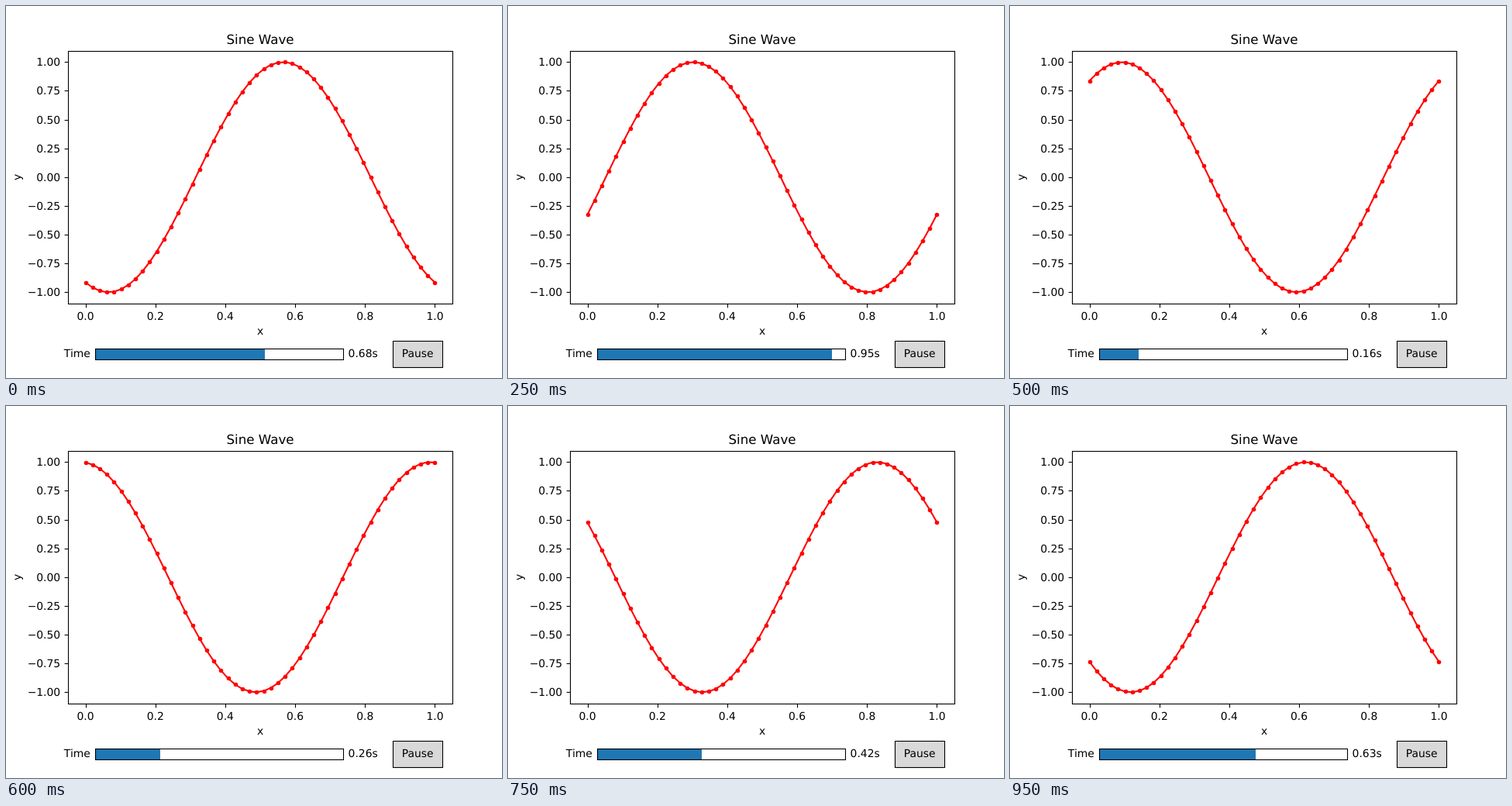
These frames come from a looping animation (640x480 px, 1000 ms). An HTML page:

```html
<!DOCTYPE html>
<html lang="en">
<head>
<meta charset="utf-8">
<title>Sine Wave</title>
<style>
  html, body { margin: 0; width: 100%; height: 100%; overflow: hidden; background: #fff; }
  svg { display: block; width: 640px; height: 480px; }
  text { font: 13.89px "DejaVu Sans", sans-serif; fill: #000; text-rendering: geometricPrecision; }
  .title { font-size: 16.67px; }
  .mid { text-anchor: middle; }
  .end { text-anchor: end; }
  .frame { fill: none; stroke: #000; stroke-width: 1.1; }
  .wave { fill: none; stroke: #f00; stroke-width: 2.08; stroke-linejoin: round; stroke-linecap: square; }
</style>
</head>
<body>
<svg viewBox="0 0 640 480">
  <g id="ticks"></g>
  <polyline id="wave" class="wave"/>
  <g id="dots" fill="#f00"></g>
  <rect class="frame" x="80.5" y="58.5" width="496" height="326"/>
  <text class="title mid" x="328" y="49">Sine Wave</text>
  <text class="mid" x="328" y="424">x</text>
  <text class="mid" transform="translate(18.5 221) rotate(-90)">y</text>

  <rect id="bar" x="115" y="442" height="14" fill="#1f77b4"/>
  <rect class="frame" x="115.5" y="442.5" width="320" height="14"/>
  <text class="end" x="108.8" y="453">Time</text>
  <text id="value" x="441.6" y="453"></text>

  <rect class="frame" x="499.5" y="432.5" width="64" height="34" style="fill:#d9d9d9"/>
  <text class="mid" x="531.2" y="453">Pause</text>
</svg>
<script>
const STEP_MS = 50, STEPS = 20, FIRST = 13, POINTS = 50;
const $ = id => document.getElementById(id);
const px = x => 102.545 + 450.909 * x;
const py = y => 220.8 - 148.44 * y;
const snap = v => Math.floor(v + 0.5) + 0.5;

function add(parent, tag, attrs, label) {
  const el = document.createElementNS("http://www.w3.org/2000/svg", tag);
  for (const name in attrs) el.setAttribute(name, attrs[name]);
  if (label) el.textContent = label;
  parent.appendChild(el);
  return el;
}

// Axis ticks and labels
for (let i = 0; i <= 5; i++) {
  const x = snap(px(i / 5));
  add($("ticks"), "path", { class: "frame", d: `M${x} 384.5V389.4` });
  add($("ticks"), "text", { class: "mid", x: px(i / 5), y: 405 }, (i / 5).toFixed(1));
}
for (let i = -4; i <= 4; i++) {
  const y = snap(py(i / 4));
  const label = (i < 0 ? "\u2212" : "") + Math.abs(i / 4).toFixed(2);
  add($("ticks"), "path", { class: "frame", d: `M80.5 ${y}H75.6` });
  add($("ticks"), "text", { class: "end", x: 70.2, y: y + 4.5 }, label);
}

const xs = Array.from({ length: POINTS }, (_, i) => i / (POINTS - 1));
const dots = xs.map(x => add($("dots"), "circle", { cx: snap(px(x)), r: 2.78 }));

function draw(step) {
  const time = step / (STEPS - 1);
  const ys = xs.map(x => py(Math.sin(2 * Math.PI * (x + time))));
  $("wave").setAttribute("points", xs.map((x, i) => px(x) + "," + ys[i]).join(" "));
  dots.forEach((dot, i) => dot.setAttribute("cy", snap(ys[i])));
  $("bar").setAttribute("width", Math.round(115.2 + 320 * time) - 115);
  $("value").textContent = time.toFixed(2) + "s";
}

const start = performance.now();
let shown = -1;
function tick() {
  const elapsed = Math.max(0, performance.now() - start);
  const step = (FIRST + Math.floor(elapsed / STEP_MS)) % STEPS;
  if (step !== shown) draw(shown = step);
  requestAnimationFrame(tick);
}
tick();
</script>
</body>
</html>
```
